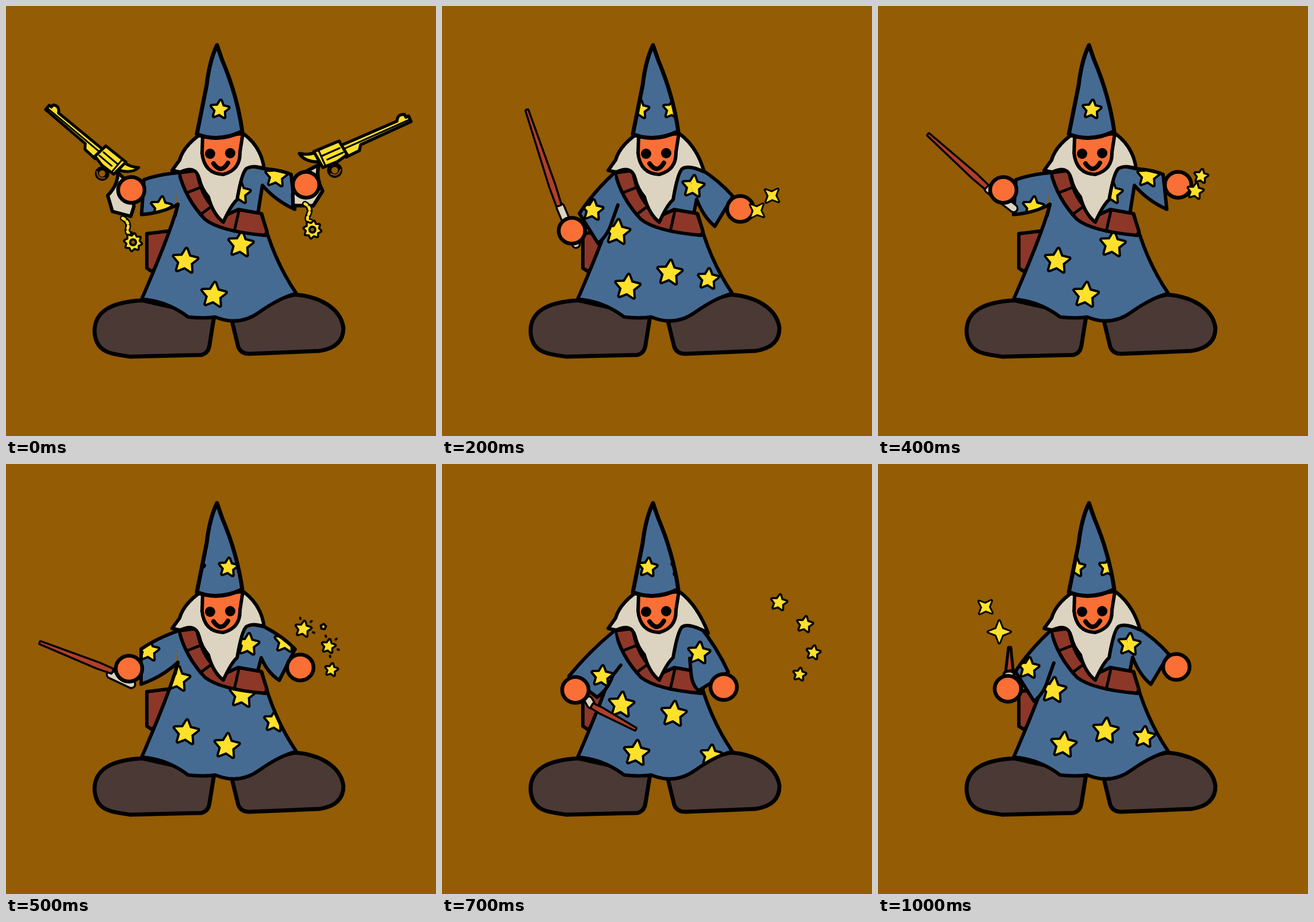
Write an HTML page that moves like this. It is 748x748 px and loops after 1.1 s.

```html
<!DOCTYPE html>
<html lang="en">
<head>
<meta charset="utf-8">
<title>Wizard</title>
<style>
html, body { margin: 0; width: 100%; height: 100%; overflow: hidden; background: #935c05; }
svg { display: block; width: 100vw; height: 100vh; }
svg * { stroke-linejoin: round; stroke-linecap: round; }
.halo { paint-order: stroke; }
.cel, .pose { visibility: hidden; animation: cel 1.1s step-end infinite; }
.pose { animation-name: thrice; }
.pose.twice { animation-name: twice; }
@keyframes cel { 0% { visibility: visible } 9.0909%, 100% { visibility: hidden } }
@keyframes thrice {
  0%, 36.3636%, 72.7272% { visibility: visible }
  9.0909%, 45.4545%, 81.8181%, 100% { visibility: hidden }
}
@keyframes twice {
  0%, 36.3636% { visibility: visible }
  9.0909%, 45.4545%, 100% { visibility: hidden }
}
</style>
</head>
<body>
<svg id="stage" viewBox="0 0 748 748" preserveAspectRatio="none"></svg>
<script>
const INK = '#000', GROUND = '#935c05', BLUE = '#466b93', BONE = '#dcd4c0', SKIN = '#f96f36',
  BOOT = '#4b3936', LEATHER = '#8d3729', GOLD = '#ffe12b', WAND = '#b03f2b', COPPER = '#d67d25';

const shape = (d, fill, w = 6, cls = '') =>
  `<path class="${cls}" d="${d}" fill="${fill}" stroke="${INK}" stroke-width="${w}"/>`;
const line = (d, w = 6, color = INK) => `<path d="${d}" fill="none" stroke="${color}" stroke-width="${w}"/>`;
const oval = (x, y, rx, ry, fill, w = 0) =>
  `<ellipse cx="${x}" cy="${y}" rx="${rx}" ry="${ry}" fill="${fill}" stroke="${INK}" stroke-width="${w}"/>`;
const polar = (x, y, r, deg) => {
  const a = deg * Math.PI / 180;
  return [x + r * Math.cos(a), y + r * Math.sin(a)];
};
const lerp = (a, b, t) => a + (b - a) * t;

function star(x, y, r, turn = 6, points = 5, inner = .5, w = 8) {
  const corners = Array.from({ length: points * 2 }, (_, i) =>
    polar(x, y, i % 2 ? r * inner : r, turn - 90 + i * 180 / points));
  return shape(`M${corners.join('L')}z`, GOLD, w, 'halo');
}
const twinkle = (x, y, r = 13) => star(x, y, r, 10, 5, .5, 7);
const spark = (x, y, r = 15, turn = 42) => star(x, y, r, turn, 4, .4, 6);
const rays = (x, y, r, count, length, w) => Array.from({ length: count }, (_, i) => {
  const a = i * 62 - 105;
  return line(`M${polar(x, y, r, a)}L${polar(x, y, r + length, a)}`, w);
}).join('');

// Stars drift along these tracks, one follows the next every four steps.
const tracks = [
  { start: 1, pace: 2, r: 21, keys: [[298, 374], [312, 419], [313, 467], [338, 503], [384, 491], [403, 435], [411, 402]] },
  { start: 0, pace: 1, r: 18, keys: [[406, 325], [421, 314], [437, 314], [447, 329], [470, 296], [486, 309]] },
  { start: 1, pace: 1, r: 17, keys: [[467, 448], [463, 475], [468, 507]] }
];
function along(keys, u) {
  const i = Math.floor(u), t = u - i, key = n => keys[Math.max(0, Math.min(n, keys.length - 1))];
  return [0, 1].map(c => {
    const [a, b, d, e] = [-1, 0, 1, 2].map(n => key(i + n)[c]);
    return b + t * ((d - a) + t * (2 * a - 5 * b + 4 * d - e + t * (3 * b - a - 3 * d + e))) / 2;
  });
}
function driftingStars(step) {
  let out = '';
  for (const { start, pace, r, keys } of tracks)
    for (let k = (step - start + 4) % 4; k <= (keys.length - 1) * pace; k += 4)
      out += star(...along(keys, k / pace), r);
  return out;
}
const hatStars = step => [0, -57].map(lag => star(372 + 14.4 * step + lag, 180, 15)).join('');

// Blue cloth: fill, stars clipped to it, then the open outline.
let clips = 0;
function cloth(d, stars, bare = '', w = 6) {
  const id = 'c' + ++clips, area = `<path d="${d}"/><path d="${bare}"/>`;
  return `<clipPath id="${id}">${area}</clipPath><g fill="${BLUE}">${area}</g>
    <g clip-path="url(#${id})">${stars}</g>${line(d, w)}`;
}

// side is 1 for the sleeve on the right, -1 for the one on the left.
function sleeve(side, [x, y], tilt, pit, end) {
  const [sx, sy] = side > 0 ? [449, 283] : [300, 290];
  const [bx, by] = polar(x, y, 61, 90 - tilt);
  return `M${side > 0 ? '430 279L' : ''}${sx} ${sy}Q${(sx + x) / 2 + side * 5} ${(sy + y) / 2 - 3} ${x} ${y}
    L${bx} ${by}Q${(bx + pit[0]) / 2 - side * 5} ${(by + pit[1]) / 2 + 6} ${pit}L${end}`;
}

const ROBE = 'M299 345Q288 390 236 510 280 513 317 541 345 544 364 541 405 558 440 533 475 508 505 500 464 440 445 362';
const CHEST = 'M297 292L298 346 305 400H447L441 350V284H410z';
const HAT = 'M367 68Q354 95 349 138L332 223Q370 238 411 218 402 155 376 94z';

const poses = [
  { tip: 449, hands: [[218, 320], [522, 311]], left: [[240, 302], -4, [299, 345], [294, 365]],
    right: [[496, 293], 6, [446, 312], [439, 356]], patch: [30, 48] },
  { tip: 449, hands: [[217, 327], [512, 354]], left: [[239, 308], 0, [299, 345], [294, 365]],
    right: [[503, 322], -27, [444, 337], [439, 356]], patch: [13, 3] },
  { tip: 456, hands: [[226, 391], [519, 353]], left: [[239, 361], 32, [296, 374], [306, 346]],
    right: [[506, 331], -31, [443, 336], [439, 356]], patch: [23, -6] },
  { tip: 463, hands: [[224, 390], [490, 388]], left: [[221, 369], 53, [297, 368], [311, 350]],
    right: [[498, 362], -58, [433, 362], [431, 338]], patch: [57, 0] }
];

const boots = shape('M237 512C185 515 154 530 154 566 156 602 180 605 216 610L340 607Q352 604 354 590L362 540z', BOOT, 7) +
  shape('M393 548L404 593Q409 606 425 605L545 600Q587 594 587 560C582 525 545 505 502 502L450 515z', BOOT, 7);
const bag = shape('M245 396L286 391 270 445 254 462 245 456z', LEATHER);
const belt = shape('M301 290Q312 335 346 371 372 392 451 399L454 392 444 361 404 354 378 366Q340 340 332 286z', LEATHER) +
  line('M314 325L340 315M338 363L357 349M397 392L405 357', 5);
const head = tip =>
  shape(`M334 226Q308 246 302 268L289 286 303 289Q330 276 336 300 340 318 352 332 360 362 378 376 392 345 402 337
    410 290 418 283 430 276 ${tip} ${tip + 30 - 449 + 254}Q444 245 413 222z`.replace(/ \d+Q444/, ` ${283 + (tip - 449) * .8}Q444`), BONE) +
  shape('M342 228L341 256Q345 292 378 293 408 285 407 254L412 222z', SKIN) +
  oval(355, 257, 9, 9, INK) + oval(390, 256, 9, 9, INK) + line('M361 274Q374 293 386 273', 8);

const figure = (p, step) => boots + bag + cloth(ROBE, driftingStars(step), CHEST) + belt +
  cloth(sleeve(1, ...p.right), driftingStars(step)) + head(p.tip) + cloth(HAT, hatStars(step), '', 7);

const hand = ([x, y]) => oval(x, y, 23, 22.5, SKIN, 6.5);

function spur(x0, y0, x, y) {
  const chain = `M${x0} ${y0}Q${x0 + 12} ${y0 + 7} ${(x0 + x) / 2} ${(y0 + y) / 2 - 4}T${x - 3} ${y - 14}`;
  return line(chain, 10) + `<g stroke-dasharray="4 5">${line(chain, 5, GOLD)}</g>` +
    star(x, y, 14, 10, 8, .7, 7) + oval(x, y, 5, 5, GROUND, 4);
}

// Revolver lying along +x with its cylinder at the origin.
const gun = place => `<g transform="${place}">` +
  shape('M-26 8Q-40 25 -38 50L-62 66 -92 52 -85 35 -55 10z', BONE) +
  oval(-6, 27, 9, 9, 'none', 7) + `<g opacity=".6">${line('M-14 30Q-6 40 3 30', 2.5, COPPER)}</g>` +
  shape('M18 -6L120 -5Q126 -16 136 -10V-5H141V5L50 6 44 14 20 15z', GOLD, 5) + line('M20 1H138', 3) +
  shape('M-22 -12Q-36 -13 -48 -22 -46 -6 -24 4z', GOLD, 5) +
  shape('M-25 -15L20 -14 23 12 4 16 -22 15z', GOLD, 5) + line('M-16 -3H16M-10 6H18M-17 -13V13', 3) + '</g>';

const grip = d => line(d, 17) + line(d, 10, BONE);
function wand(x0, y0, x1, y1, held = '', color = WAND) {
  const length = Math.hypot(x1 - x0, y1 - y0), deg = Math.atan2(y1 - y0, x1 - x0) * 180 / Math.PI;
  return (held && grip(held)) + `<g transform="translate(${x0} ${y0}) rotate(${deg})">` +
    shape(`M0 -1L${length * .8} -4 ${length} -3V3L${length * .8} 4 0 1z`, color, 7, 'halo') + '</g>';
}

// A burst of four stars flying away from the hand.
const flight = [[517, 287, 586, 241], [552, 283, 631, 279], [561, 317, 646, 328], [566, 358, 622, 366]];
const burst = t => flight.map(([x0, y0, x1, y1], i) =>
  twinkle(lerp(x0, x1, t), lerp(y0, y1, t), i === 1 ? lerp(3, 13, Math.sqrt(t)) : 13 - i)).join('');

const cels = [
  { props: gun('translate(180 267) rotate(40) scale(-1 1)') + gun('translate(566 257) rotate(-24) scale(1.06)') +
    spur(203, 369, 221, 411) + spur(520, 344, 533, 389) },
  { props: grip('M206 303L210 365') + wand(106, 159, 182, 250, '', COPPER) +
    shape('M153 225L152 237 188 291 205 300 214 285 207 260 183 247z', COPPER, 5) +
    line('M174 253L194 288M184 250L205 283M171 260L186 250', 4) + spur(218, 378, 219, 403),
    front: spark(562, 324) + spark(601, 293, 19, 0) + spark(641, 267) },
  { props: wand(148, 182, 203, 346, 'M206 350L233 414'), front: spark(548, 356) + spark(574, 330) },
  { props: wand(180, 182, 208, 346, 'M211 352L223 414'), front: twinkle(524, 391, 17) + rays(524, 391, 27, 4, 5, 5) },
  { props: wand(88, 224, 188, 314, 'M192 318L236 352'), front: twinkle(552, 322) + twinkle(562, 296, 11) },
  { hand: [214, 356], cuff: [235, 322], props: wand(60, 311, 184, 360, 'M182 366L218 383'),
    front: burst(0) + rays(517, 287, 18, 3, 2, 4) + rays(561, 317, 17, 4, 2, 4) },
  { props: wand(172, 492, 208, 415, 'M209 412L222 395'), front: burst(.5) },
  { hand: [232, 393], props: wand(336, 461, 262, 421, 'M255 411L259 418'), front: burst(1) },
  { hand: [226, 343], cuff: [248, 303], props: wand(288, 190, 241, 308, 'M239 315L235 322') },
  { hand: [214, 356], cuff: [235, 322], props: wand(240, 232, 222, 322, 'M221 328L219 338') },
  { props: oval(228, 366, 9, 6, BONE, 5) + shape('M227 319L222 361 235 359 231 319z', WAND, 5),
    front: spark(187, 249) + spark(211, 292, 19, 0) }
];
function cel({ hand: held, cuff, props, front = '' }, i) {
  const { hands, left, patch } = poses[i % 4], at = cuff || left[0];
  const arm = sleeve(-1, at, ...left.slice(1));
  return cloth(arm, star(at[0] + patch[0], at[1] + patch[1], 17)) + props + hand(held || hands[0]) + hand(hands[1]) + front;
}

const layer = (cls, step, body) =>
  `<g class="${cls}" style="animation-delay:${step ? step * 100 - 1100 : 0}ms">${body}</g>`;

document.getElementById('stage').innerHTML =
  `<rect width="748" height="748" fill="${GROUND}"/>` +
  poses.map((p, i) => layer(i === 3 ? 'pose twice' : 'pose', i, figure(p, i))).join('') +
  cels.map((c, i) => layer('cel', i, cel(c, i))).join('');
</script>
</body>
</html>
```
